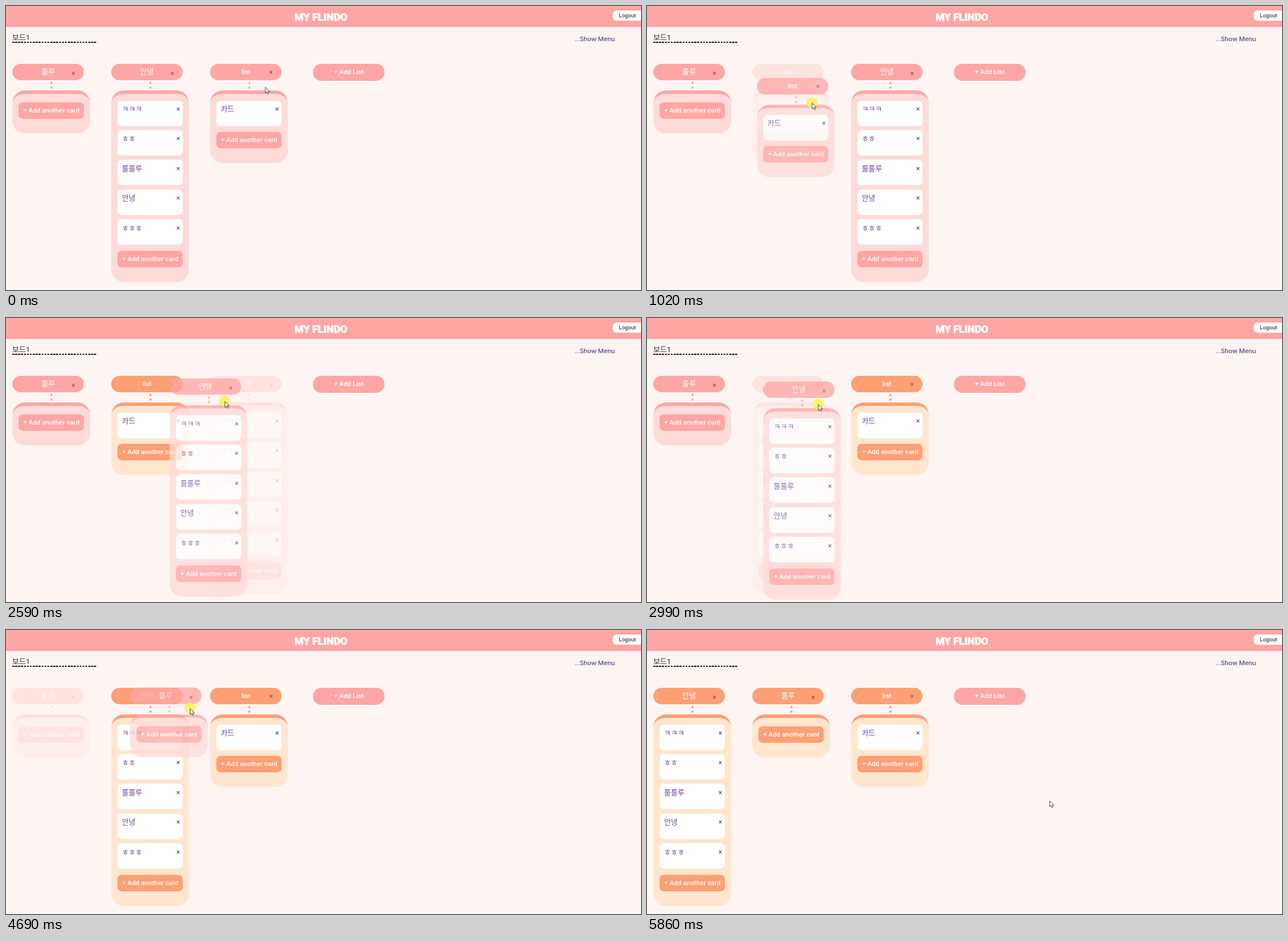
These frames come from a looping animation (1119 by 501 pixels, 5960 ms). An HTML page:

```html
<!DOCTYPE html>
<html lang="ko">
<head>
<meta charset="utf-8">
<title>Board</title>
<style>
html, body { margin: 0; width: 100%; height: 100%; overflow: hidden; }
body { position: relative; background: #fff5f3; font: 500 11.66px/20px Roboto, "Noto Sans CJK KR", "Noto Sans CJK", sans-serif; }
div, span, svg { position: absolute; box-sizing: border-box; white-space: nowrap; }
.ko { font-size: 13px; font-weight: 300; }
.top { left: 0; top: 0; width: 100%; height: 37px; background: #ffa6a4; }
.brand { left: 455px; top: 9.5px; width: 200px; text-align: center; color: #fff; font-size: 18px; font-weight: 900; -webkit-text-stroke: .6px #fff; }
.logout { left: 1069px; top: 8px; width: 54px; height: 18px; border-radius: 7px; background: #fff; color: #111;
  font-size: 9.71px; font-weight: 400; line-height: 18px; padding-left: 11px; }
.board { left: 11px; top: 46px; color: #333; font-weight: 400; }
.rule { left: 11px; top: 63px; width: 148px; height: 2px; background: repeating-linear-gradient(90deg, #111 0 3.5px, transparent 3.5px 5.16px); }
.menu { left: 1002px; top: 47.5px; color: #4b2a7b; font-size: 11.8px; font-weight: 400; }
.list { left: 0; top: 0; width: 138px; --main: #ffa6a4; --soft: #fedbd9; }
.list.moved { --main: #ff9f74; --soft: #ffe6cf; }
.pill { left: 0; top: 102px; width: 126px; height: 29px; border-radius: 14.6px; background: var(--main, #ffa6a4); color: #fff; text-align: center; line-height: 28.5px; }
.dot { left: 67px; width: 4px; height: 4px; border-radius: 50%; background: var(--main); }
.body { left: 0; top: 149px; width: 137.3px; border-radius: 21.9px; border-top: 6px solid var(--main); background: var(--soft); }
.card { left: 11.3px; width: 115px; height: 45px; border-radius: 7.3px; background: #fff; color: #6d4291; }
.card .ko { left: 7.5px; top: 5.5px; }
.x { width: 12px; text-align: center; font-size: 12px; font-weight: 400; color: #4b2a7b; }
.title-x { left: 101.5px; color: #705363; }
.card .x { left: 100.7px; top: 5.5px; }
.add { left: 11.3px; width: 115px; height: 29px; border-radius: 7.3px; background: var(--main); color: #fff; text-align: center; line-height: 29px; }
.ghost { opacity: .76; }
.press { left: -10px; top: -10px; width: 19px; height: 19px; border-radius: 50%; background: #fdf266; }
#pointer { left: 0; top: 0; }
#pointer svg { left: 0; top: 0; overflow: visible; }
</style>
</head>
<body>
<div class="top"></div>
<div class="brand">MY FLINDO</div>
<div class="logout">Logout</div>
<div class="board ko">보드1</div>
<div class="rule"></div>
<div class="menu">...Show Menu</div>
<div class="pill" style="left:541px;height:29.5px">+ Add List</div>
<div id="lists"></div>
<div id="ghosts"></div>
<div id="pointer">
  <div class="press"></div>
  <svg width="9" height="13"><path d="M0 0V10.4L2.4 8.2L4.1 12L5.9 11.2L4.3 7.6H7.6Z" fill="#fff" stroke="#333" stroke-width=".9"/></svg>
</div>
<script>
const LOOP = 5960;
const STEP = 100;
const PITCH = 52.4;
const slotX = slot => 11.2 + slot * 174.2;

const lists = [
  { title: '룰루', cards: [] },
  { title: '안녕', cards: ['ㅋㅋㅋ', 'ㅎㅎ', '룰룰루', '안녕', 'ㅎㅎㅎ'] },
  { title: 'list', cards: ['카드'] }
];

// A held list trades places with `other` at `swap` and changes colour at `drop`.
const drags = [
  { held: 2, other: 1, lift: 400, swap: 820, drop: 1320 },
  { held: 1, other: 2, lift: 2240, swap: 2690, drop: 3190 },
  { held: 0, other: 1, lift: 4090, swap: 5190, drop: 5290 }
];

// Places where the pointer rests; it glides between them.
const stops = [
  { t: 0, x: 457, y: 143 },
  { t: 400, x: 457, y: 146 },
  { t: 1020, x: 291, y: 171 },
  { t: 1240, x: 287, y: 170 },
  { t: 1940, x: 484, y: 142 },
  { t: 2240, x: 457, y: 142.5 },
  { t: 2980, x: 302, y: 152.5 },
  { t: 3170, x: 282, y: 152 },
  { t: 3850, x: 116, y: 139 },
  { t: 4090, x: 117, y: 139 },
  { t: 4830, x: 346, y: 138.5 },
  { t: 5250, x: 346, y: 138 },
  { t: 5660, x: 434, y: 173 },
  { t: 5860, x: 709.5, y: 301.5 }
];

// The picture advances in steps, restarting their rhythm at these times.
const beats = [0, 620, 1890, 3890, 5660];

function hold(t) {
  const beat = beats.filter(b => b <= t).pop();
  return beat + Math.floor((t - beat) / STEP) * STEP;
}

function pointerAt(t) {
  const next = stops.findIndex(s => s.t > t);
  if (next < 0) return stops[stops.length - 1];
  const a = stops[next - 1], b = stops[next];
  const p = (t - a.t) / (b.t - a.t);
  const k = p * p * (3 - 2 * p);
  return { x: a.x + (b.x - a.x) * k, y: a.y + (b.y - a.y) * k };
}

function buildList({ title, cards }) {
  const el = document.createElement('div');
  const korean = title !== 'list';
  const n = cards.length;
  el.className = 'list';
  el.innerHTML = `
    <div class="pill${korean ? ' ko' : ''}">${title}</div>
    <span class="x title-x" style="top:${korean ? 108.5 : 106.7}px">×</span>
    <div class="dot" style="top:134px"></div><div class="dot" style="top:142px"></div>
    <div class="body" style="height:${75.8 + n * PITCH}px"></div>` +
    cards.map((text, i) => `
    <div class="card" style="top:${166.5 + i * PITCH}px"><span class="ko">${text}</span><span class="x">×</span></div>`).join('') + `
    <div class="add" style="top:${169.8 + n * PITCH}px">+ Add another card</div>`;
  return el;
}

const byId = id => document.getElementById(id);
const pointer = byId('pointer');
const press = pointer.querySelector('.press');
const columns = lists.map(list => byId('lists').appendChild(buildList(list)));
const ghosts = drags.map(drag => {
  const ghost = buildList(lists[drag.held]);
  ghost.classList.add('ghost');
  return byId('ghosts').appendChild(ghost);
});

const place = (el, x, y) => { el.style.transform = `translate(${x}px, ${y}px)`; };

function render(t) {
  const at = pointerAt(t);
  const slots = lists.map((_, i) => i);
  let active = null;

  drags.forEach((d, i) => {
    const dragging = t >= d.lift && t < d.drop;
    const grab = pointerAt(d.lift);
    if (dragging) active = d;
    ghosts[i].style.display = dragging ? '' : 'none';
    place(ghosts[i], slotX(slots[d.held]) + at.x - grab.x, at.y - grab.y);
    if (t >= d.swap) [slots[d.held], slots[d.other]] = [slots[d.other], slots[d.held]];
  });

  columns.forEach((el, i) => {
    place(el, slotX(slots[i]), 0);
    el.style.opacity = active && active.held === i ? .22 : 1;
    el.classList.toggle('moved', drags.some(d => d.held === i && t >= d.drop));
  });
  place(pointer, at.x, at.y);
  press.style.display = active ? '' : 'none';
}

const origin = performance.now();
function frame() {
  render(hold((performance.now() - origin) % LOOP));
  requestAnimationFrame(frame);
}
frame();
</script>
</body>
</html>
```
